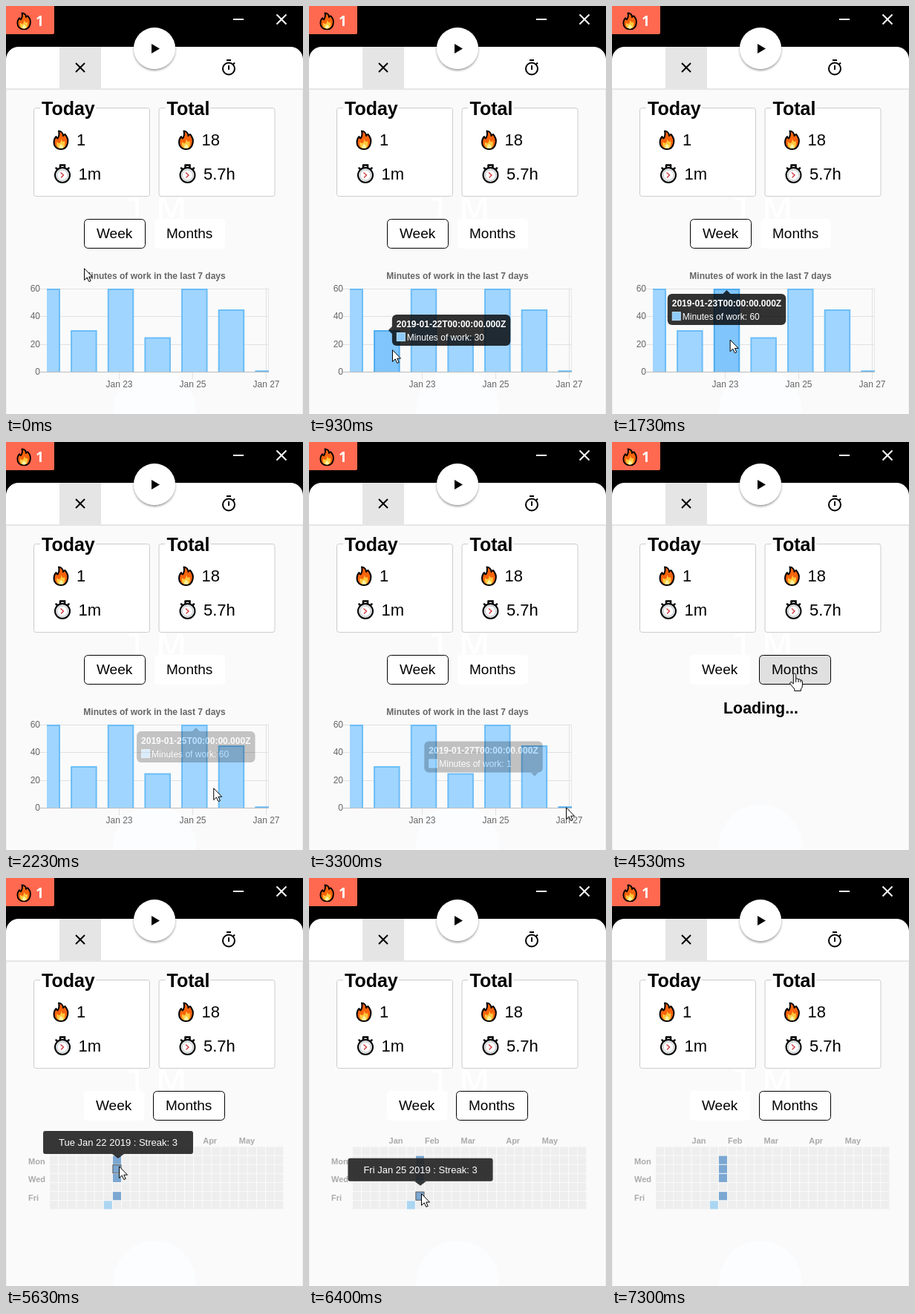
These frames come from a looping animation (400 by 550 pixels, 7710 ms). An HTML page:

```html
<!DOCTYPE html>
<html lang="en">
<head>
<meta charset="utf-8">
<title>Timer statistics</title>
<style>
  html, body { margin: 0; width: 100%; height: 100%; overflow: hidden; background: #000; }
  svg { display: block; width: 400px; height: 550px; font-family: "Liberation Sans", Arial, sans-serif; }
  .b { font-weight: bold; }
</style>
</head>
<body>
<svg viewBox="0 0 400 550">
  <defs>
    <clipPath id="area"><rect x="55" y="376" width="299" height="117.5"/></clipPath>
    <filter id="shade" x="-20%" y="-20%" width="140%" height="150%">
      <feDropShadow dx="0" dy="2" stdDeviation="1.5" flood-opacity=".4"/>
    </filter>
    <g id="flame">
      <path d="M8 1.5C12 2 14 5 14 8Q15 6 16.5 6C20 10 21 14 20 18C19 23 15.500 26 11 26C5 26 1.500 22 1.500 17Q1.500 12 4.500 9Q5 11 6.500 11.500Q9.500 7 8 1.500Z" fill="#f7630c" stroke="#000" stroke-width="2" stroke-linejoin="round"/>
      <path d="M11.500 12Q12 15 14 16L16 15Q18 25 11 25Q4 25 5.500 16Q7 18 9 18Q11.500 16 11.500 12Z" fill="#ffc83d"/>
      <path d="M11 19Q14 21 14 23Q14 25 11 25Q8 25 8.500 22.500Q9 20.500 11 19Z" fill="#fff3a0"/>
    </g>
    <g id="watch" stroke="#000">
      <path d="M9 1.500H15V5M9 1.500V5M3.500 5.500L6 8M20.500 5.500L18 8" fill="none" stroke-width="2.500" stroke-linecap="round"/>
      <circle cx="12" cy="15" r="10" fill="#e3e6e8" stroke-width="2"/>
      <circle cx="12" cy="15" r="7" fill="#fff" stroke="#c3c8cc" stroke-width="1"/>
      <path d="M9.500 11.500L13.500 15L10 18.500" fill="none" stroke="#d13438" stroke-width="1.300"/>
    </g>
  </defs>

  <rect width="400" height="550"/>
  <rect y="100" width="400" height="450" fill="#fafafa"/>
  <path d="M.5 111V550M399.500 111V550" stroke="#efefef"/>
  <rect y="111" width="400" height="2" fill="#e6e6e6"/>
  <path d="M0 111V72A17 17 0 0 1 17 55H383A17 17 0 0 1 400 72V111Z" fill="#fff"/>
  <rect x="72" y="55" width="56" height="56" fill="#e5e5e5"/>
  <path d="M94 77L106 89M106 77L94 89" stroke="#000" stroke-width="2"/>
  <g fill="none" stroke="#000" stroke-width="2">
    <circle cx="300" cy="84.500" r="8"/>
    <path d="M297 73H303M300 80V86M306 78.500L308 76.500"/>
  </g>
  <circle cx="200" cy="57" r="28" fill="#fff" filter="url(#shade)"/>
  <path d="M196 51L207 57.500L196 64Z"/>

  <path d="M0 0H65V36A2 2 0 0 1 63 38H0Z" fill="#ff6950"/>
  <use href="#flame" transform="translate(14 8) scale(.93 .9)"/>
  <text class="b" x="40" y="27" font-size="19" fill="#fff" style="font-family:'Open Sans',sans-serif">1</text>
  <path d="M306 18H320M364.500 11.500L377.500 24.500M377.500 11.500L364.500 24.500" stroke="#fff" stroke-width="2"/>

  <circle cx="200" cy="545" r="56" fill="#fbfdff"/>
  <g fill="#fff" font-size="50" style="font-family:'DejaVu Sans',sans-serif">
    <text x="160" y="293">1</text><text x="201" y="293">M</text>
  </g>
  <g id="cards"></g>
  <g id="view"></g>
</svg>
<script>
const LOOP = 7710, CLICK = 4530, LOADED = 4600;
const $ = id => document.getElementById(id);
const pen = document.createElement('canvas').getContext('2d');
pen.font = '13px "Liberation Sans", Arial, sans-serif';

const rect = (x, y, w, h, fill, more = '') =>
  `<rect x="${x}" y="${y}" width="${w}" height="${h}" fill="${fill}" ${more}/>`;
const text = (x, y, size, s, more = '') =>
  `<text x="${x}" y="${y}" font-size="${size}" ${more}>${s}</text>`;
const line = (d, stroke) => `<path d="${d}" fill="none" stroke="${stroke}"/>`;
const easeOut = (k, power) => 1 - (1 - Math.min(k, 1)) ** power;
const mix = (a, b, k) => a.map((v, i) => v + (b[i] - v) * k);

function card(x, name, gap, count, time) {
  return rect(x + .5, 137.5, 156, 119, '#fff', 'rx="3" stroke="#ccc"') +
    rect(x + 9, 137, gap, 1, '#fff') +
    text(x + 11, 147, 25, name, 'class="b"') +
    `<use href="#flame" x="${x + 26}" y="167"/><use href="#watch" x="${x + 27}" y="213"/>` +
    text(x + 58, 188, 22, count) + text(x + 60.5, 234, 22, time);
}
$('cards').innerHTML = card(37, 'Today', 75, '1', '1m') + card(205.5, 'Total', 61, '18', '5.7h');

// pointer moves: start, end, x, y; it rests in between
const moves = [
  [560, 970, 112, 463], [1250, 1730, 158, 449], [1730, 1960, 207, 465],
  [2075, 2275, 280, 466], [2450, 2630, 319, 470], [2780, 2970, 346, 490],
  [3280, 3300, 346, 492], [3650, 3800, 306, 415], [3800, 4150, 243, 299],
  [4150, 4270, 246, 312], [4580, 5300, 149, 368], [5320, 5630, 152, 388],
  [5750, 6530, 151, 425], [6550, 6670, 148, 428], [6850, 6950, 140, 440],
  [6950, 7300, 17, 560]
];

function pointer(t) {
  let at = [105, 353];
  for (const [start, end, ...to] of moves) {
    if (t < start) break;
    at = mix(at, to, easeOut((t - start) / (end - start), 3));
  }
  return at;
}

// weekly bar chart
const BASE = 493, TIP_W = 159.5, TIP_H = 42;
const minutes = [60, 30, 60, 25, 60, 45, 1];
const barX = i => 55.2 + 49.65 * i;
const barY = i => BASE - minutes[i] * 1.865;

function barAt([x, y]) {
  return minutes.findIndex((_, i) => Math.abs(x - barX(i)) < 17.75 && y >= barY(i) && y <= BASE);
}

// every time the hovered bar changes, found by following the pointer
const hovers = [];
for (let t = 0, last = -1; t < CLICK; t += 3) {
  const bar = barAt(pointer(t));
  if (bar !== last) hovers.push([t, last = bar]);
}

// tooltip offset from the bar top, and its caret
function placement(i) {
  const y = barY(i), half = TIP_W / 2;
  if (y < 390) return [-half, 7, `M${half - 5} 0l5 -5l5 5Z`];
  if (y > 480) return [8 - TIP_W, -7 - TIP_H, `M${TIP_W - 16} ${TIP_H}l5 5l5 -5Z`];
  return barX(i) < 205
    ? [7, -TIP_H / 2, 'M0 16l-5 5l5 5Z']
    : [-7 - TIP_W, -TIP_H / 2, `M${TIP_W} 16l5 5l-5 5Z`];
}

// replays the hover changes up to t; each eases on from where the last stood
function tipState(t) {
  let now, goal, bar = -1, active = -1;
  hovers.forEach(([start, hit], i) => {
    if (t < start) return;
    const end = Math.min(t, i + 1 < hovers.length ? hovers[i + 1][0] : LOOP);
    active = hit;
    if (hit >= 0) {
      const [dx, dy] = placement(bar = hit);
      goal = [barX(hit) + dx, barY(hit) + dy, 1];
    } else goal = [goal[0], goal[1], 0];
    now = mix(now || [goal[0], goal[1], 0], goal, easeOut((end - start) / 200, 4));
  });
  return { now, bar, active };
}

function barTip({ now, bar }) {
  if (!now || now[2] < .01) return '';
  const [x, y, alpha] = now;
  return `<g transform="translate(${x} ${y})" opacity="${alpha}" fill="#fff"><g fill-opacity=".8">` +
    rect(0, 0, TIP_W, TIP_H, '#000', 'rx="6"') + `<path d="${placement(bar)[2]}" fill="#000"/></g>` +
    text(6, 17, 12, `2019-01-${21 + bar}T00:00:00.000Z`, 'class="b"') +
    rect(6.5, 24.5, 11, 11, '#8ecbfa', 'stroke="#b9dffc"') +
    text(20, 35, 12, `Minutes of work: ${minutes[bar]}`) + '</g>';
}

function weekChart(t) {
  const state = tipState(t), grey = 'fill="#666"';
  let s = text(200, 368, 12, 'Minutes of work in the last 7 days', `class="b" text-anchor="middle" ${grey}`);
  for (let v = 0; v <= 60; v += 20) {
    const y = Math.round(BASE - v * 1.865) + .5;
    s += line(`M45 ${y}H354`, '#e1e1e1') + text(46, y + 3.5, 12, v, `text-anchor="end" ${grey}`);
  }
  s += line('M55.5 381V493M353.5 381V493', '#e6e6e6');
  for (let day = 23; day <= 27; day += 2) {
    const x = 152.5 + 49.5 * (day - 23);
    s += line(`M${x} 381V503`, '#e1e1e1') + text(x, 514, 12, `Jan ${day}`, `text-anchor="middle" ${grey}`);
  }
  s += '<g clip-path="url(#area)">';
  minutes.forEach((_, i) => {
    const on = i === state.active;
    s += `<path d="M${barX(i) - 16.75} ${BASE}V${barY(i) + 1}h33.5V${BASE}" fill="${on ? '#80c5fb' : '#a0d5ff'}"
      stroke="${on ? '#4eacf0' : '#6cbdf7'}" stroke-width="2"/>`;
  });
  return s + '</g>' + line('M45 493.5H354', '#bbb') + barTip(state);
}

// calendar: one column per week, one row per weekday
const STEP = 12.13, LEFT = 59, TOP = 362.5;
const streaks = { 19: 1, 21: 4, 22: 3, 23: 3, 25: 3 };
const dayOf = (col, row) => 20 + (col - 7) * 7 + row;
const dateOf = day => new Date(2019, 0, day);

function calendar([px, py]) {
  const over = [Math.floor((px - LEFT) / STEP), Math.floor((py - TOP) / STEP)];
  const label = 'class="b" fill="#aaa"';
  let s = '';
  for (let c = 0; c < 26; c++) {
    const x = LEFT + c * STEP, saturday = dateOf(dayOf(c, 6));
    for (let r = 0; r < 7; r++) {
      const n = streaks[dayOf(c, r)];
      const fill = !n ? '#eee' : n > 1 ? '#7ba7d2' : '#abd6f2';
      const hit = c === over[0] && r === over[1];
      s += rect(x, TOP + r * STEP, 11.1, 11.1, fill, hit ? 'stroke="#555"' : '');
    }
    if (saturday.getDate() <= 7 && c < 25) s += text(x, 358, 11, saturday.toDateString().slice(4, 7), label);
  }
  ['Mon', 'Wed', 'Fri'].forEach((d, i) => s += text(30, 386 + i * 24.3, 11, d, label));
  const day = dayOf(...over), inGrid = over[1] >= 0 && over[1] < 7;
  return inGrid && streaks[day] ? s + dayTip(px - 1, py - 10, day) : s;
}

function dayTip(x, y, day) {
  const words = `${dateOf(day).toDateString()} : Streak: ${streaks[day]}`;
  const w = pen.measureText(words).width + 42;
  return `<g transform="translate(${x} ${y})"><g fill-opacity=".9">` +
    rect(-w / 2, -37, w, 31, '#222', 'rx="3"') + '<path d="M-8 -6H8L0 0Z" fill="#222"/></g>' +
    text(0, -17, 13, words, 'fill="#fff" text-anchor="middle"') + '</g>';
}

function button(x, end, label, chosen, fill = '#fff') {
  const box = chosen
    ? rect(x + .5, 287.5, end - x - 1, 39, fill, 'rx="5" stroke="#000"')
    : rect(x, 287, end - x, 40, fill, 'rx="5"');
  return box + text(x + (chosen ? 17 : 16), 313, 19, label);
}

const ARROW = 'M.5 .8V16.5L4.2 13L6.8 18.5L9.2 17.5L6.7 12.2H11.5Z';
const HAND = 'M5 14V1.7a1.7 1.7 0 0 1 3.4 0V7q3-.6 3.3 1q2.6-.7 3 .9q2.4-.2 2.4 2V16q0 4-2 5V23.5H6.5V21L1 14.5' +
  'q-1.5-2 .3-2.8q1.5-.4 3.7 2.3M8.4 7V12M11.7 8V12M14.7 9V12';

function cursor([x, y]) {
  const hand = x > 198 && x < 295 && y > 287 && y < 327;
  return `<path transform="translate(${hand ? x - 6.7 : x} ${y})" d="${hand ? HAND : ARROW}"
    fill="#fff" stroke="#000" stroke-linejoin="round"/>`;
}

function draw(t) {
  const at = pointer(t), months = t >= CLICK, loading = months && t < LOADED;
  const body = !months ? weekChart(t)
    : loading ? text(200.5, 366, 21.4, 'Loading...', 'class="b" text-anchor="middle"')
    : calendar(at);
  $('view').innerHTML =
    button(105, months ? 186 : 188, 'Week', !months) +
    button(months ? 198 : 200, 295, 'Months', months, loading ? '#e0e0e0' : '#fff') +
    body + cursor(at);
}

function tick() {
  draw(performance.now() % LOOP);
  requestAnimationFrame(tick);
}
tick();
</script>
</body>
</html>
```
